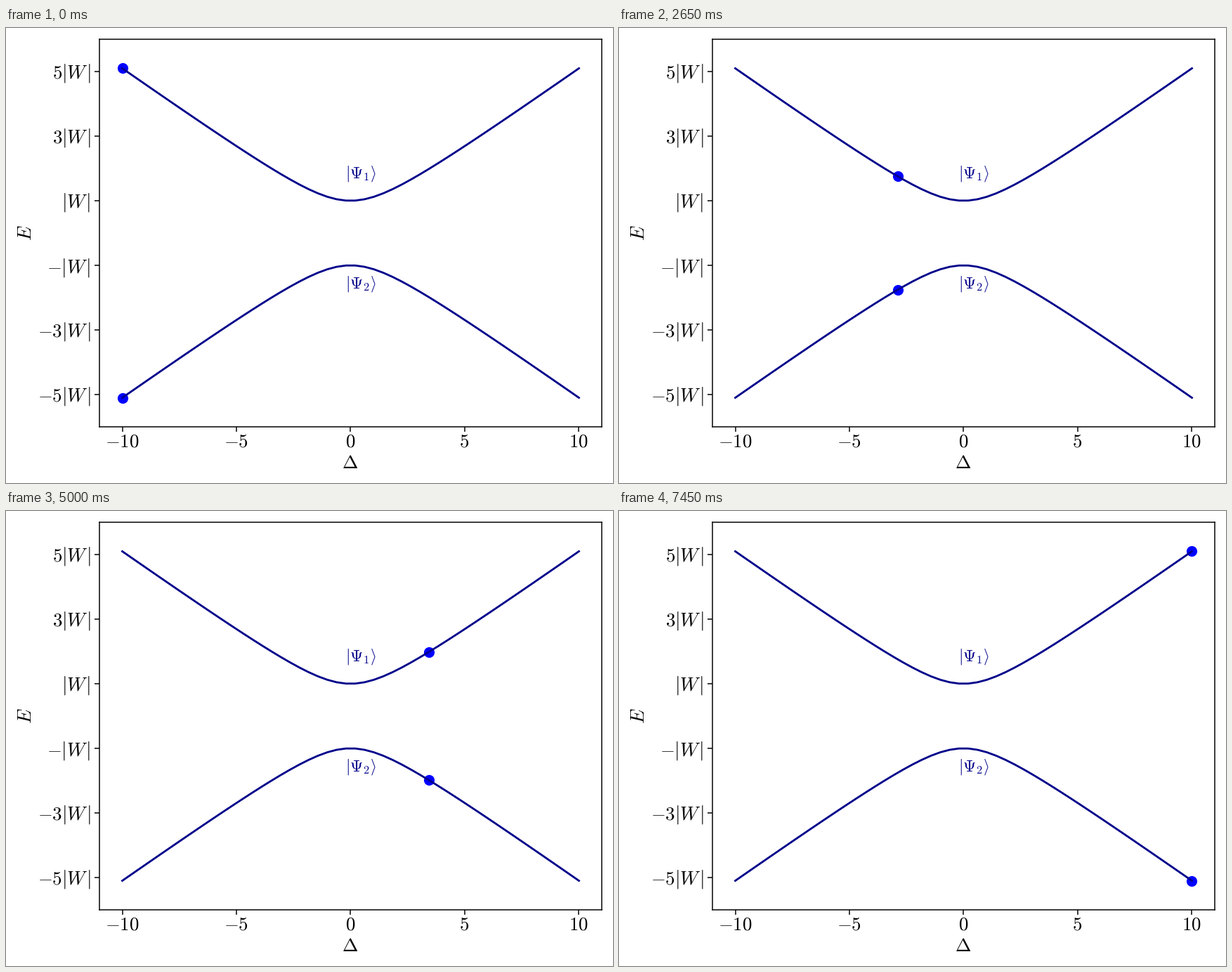
A matplotlib script that plays this animation: 864 by 648 pixels, repeating every 7500 ms.

```python
import numpy as np
import matplotlib.pyplot as plt
from matplotlib.animation import FuncAnimation

W, H, DPI = 864, 648, 135
FRAMES, INTERVAL = 150, 50
SIZE = 14.4

plt.rcParams["mathtext.fontset"] = "cm"


def energy(delta):
    return np.sqrt(1 + delta**2 / 4)


fig = plt.figure(figsize=(W / DPI, H / DPI), dpi=DPI, facecolor="white")
left, right, top, bottom = 133, 848, 16, 568
ax = fig.add_axes([left / W, 1 - bottom / H, (right - left) / W, (bottom - top) / H])
ax.set(xlim=(-11, 11), ylim=(-6, 6))
ax.set_xticks(range(-10, 11, 5), labels=[])
ax.set_yticks(range(-5, 6, 2), labels=[])


def label(x, y, tex, size=SIZE, **kw):
    """Math text with its baseline at pixel (x, y), counted from the top left."""
    return fig.text(x / W, 1 - y / H, f"${tex}$", fontsize=size, va="baseline", **kw)


# Tick labels
for n in range(-10, 11, 5):
    label(490 + 32.5 * n, 596.5, str(n), ha="center")

for n in range(-5, 6, 2):
    factor = {1: "", -1: "-"}.get(n, str(n))
    label(120, 302 - 46 * n, factor + r"|W\hspace{0.07}|", ha="right")

# Axis titles
label(489.5, 627, r"\Delta", ha="center")
label(36, 292, "E", ha="center", rotation=90, rotation_mode="anchor")

# Energy levels
grid = np.linspace(-10, 10, 50)
for k, sign in enumerate((1, -1), start=1):
    ax.plot(grid, sign * energy(grid), color="darkblue", lw=1.5)
    label(483, 292 - sign * 1.7 * 46, rf"|\Psi_{k}\mathcal{{i}}", size=12.5,
          color="darkblue", ha="left")

dots = ax.scatter([-10, -10], [energy(-10), -energy(-10)], s=50, color="blue", zorder=1)
path = np.linspace(-10, 10, FRAMES)


def update(i):
    x = path[i]
    e = energy(x)
    dots.set_offsets([(x, e), (x, -e)])
    return (dots,)


anim = FuncAnimation(fig, update, frames=FRAMES, interval=INTERVAL,
                     repeat=True, repeat_delay=0, blit=False)
plt.show()
```
